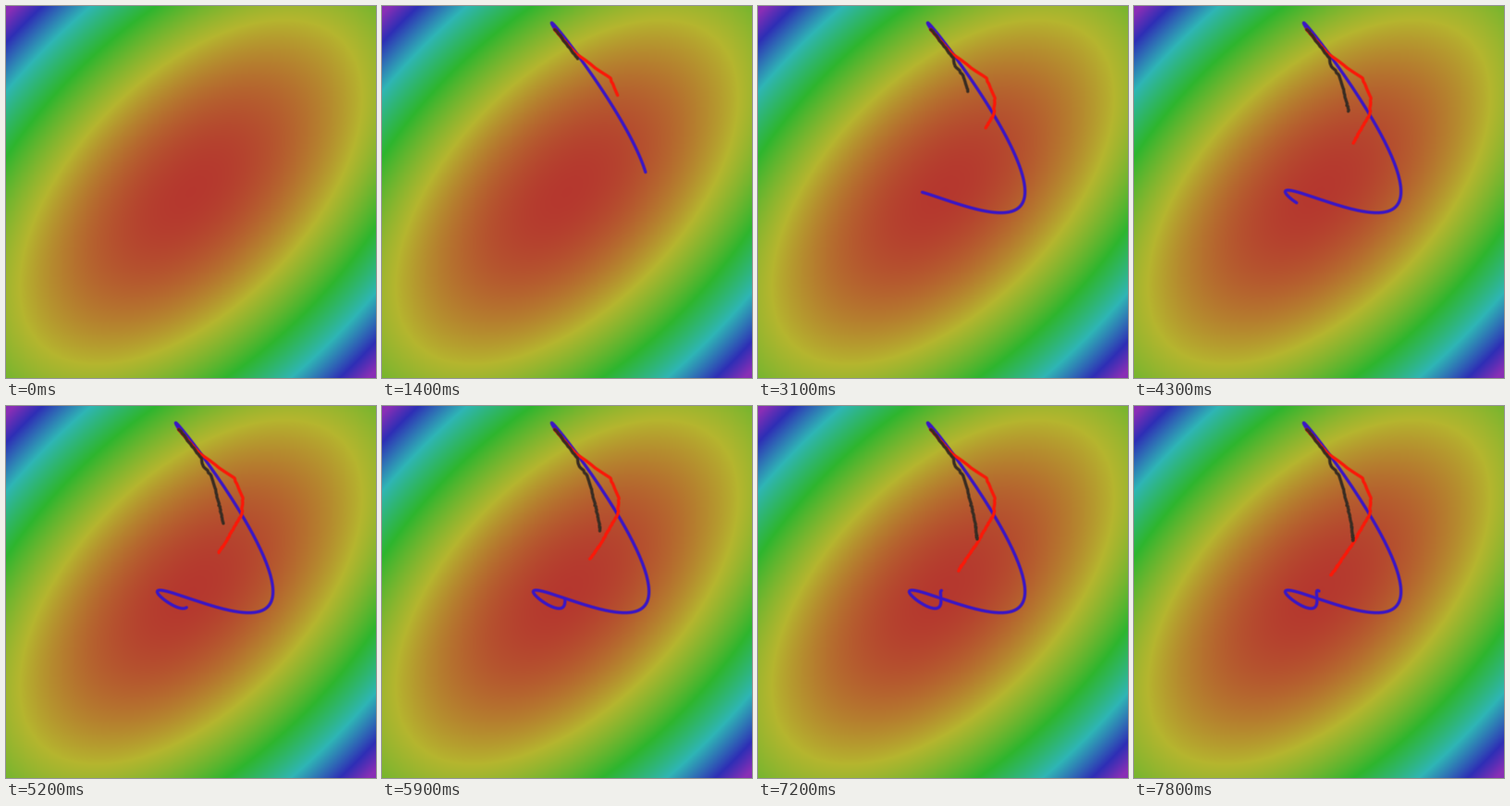
These frames come from a looping animation (400x402 px, 8 s). A matplotlib script:

```python
import numpy as np
import matplotlib.pyplot as plt
from matplotlib.animation import FuncAnimation
from matplotlib.colors import hsv_to_rgb

W, H, DPI = 400, 402, 64
FRAMES, STEP_MS, LAST = 80, 100, 78
SUB = 4  # path samples per frame
START, CENTER = np.array([187, 25]), np.array([200, 201])


def landscape():
    """Quadratic bowl, height shown as hue."""
    x, y = np.meshgrid((np.arange(W) + 0.5) / 200 - 1,
                       (np.arange(H) + 0.5) / 201 - 1)
    hue = 0.012 + 0.259 * (x * x + y * y + 1.1 * x * y)
    return hsv_to_rgb(np.dstack([np.minimum(hue, 0.78),
                                 np.full_like(hue, 0.745),
                                 np.full_like(hue, 0.71)]))


def ring(t, freq, lag, tau, power):
    """Damped swing that starts at 1."""
    return np.exp(-(t / tau) ** power) * (np.cos(freq * t)
                                          + lag * np.sin(freq * t))


def momentum(t):
    """Heavy ball: one swing along each main axis of the bowl."""
    steep, flat = np.array([1, 1]) / 2 ** 0.5, np.array([1, -1]) / 2 ** 0.5
    offset = START - CENTER
    return (CENTER
            + np.outer(ring(t, 0.18, 0.45, 24, 1.3), steep) * (offset @ steep)
            + np.outer(ring(t, 0.069, 0.27, 35, 1.8), flat) * (offset @ flat))


def wander(t, progress, corners, seed):
    """Follow the corners by travelled share, with a slight wobble."""
    pts = np.vstack([START, corners])
    dist = np.r_[0, np.cumsum(np.hypot(*np.diff(pts, axis=0).T))]
    jitter = np.random.default_rng(seed).uniform(-0.5, 0.5, (2, LAST + 1))
    return np.column_stack([
        np.interp(progress * dist[-1], dist, pts[:, c])
        + np.interp(t, np.arange(LAST + 1), jitter[c]) for c in (0, 1)])


time = np.linspace(0, LAST, LAST * SUB + 1)
share = time / LAST
descent = wander(time, share ** 0.4,
                 [(210, 52), (247, 78), (256, 100), (255, 117), (235, 151),
                  (213, 183)], 3)
adaptive = wander(time, 1 - (1 - share) ** 1.8,
                  [(211, 56), (213, 65), (222, 75), (227, 92), (235, 127),
                   (237, 145)], 8)

fig = plt.figure(figsize=(W / DPI, H / DPI), dpi=DPI)
ax = fig.add_axes([0, 0, 1, 1])
ax.imshow(landscape(), extent=(0, W, H, 0), aspect="auto",
          interpolation="nearest")
ax.set(xlim=(0, W), ylim=(H, 0))
ax.axis("off")

trails = []
for path, color in ((momentum(time), "#3a16c4"), (descent, "#fa1808"),
                    (adaptive, "#392c22")):
    for width, alpha in ((4.2, 0.45), (2.6, 1)):  # soft edge, then core
        line, = ax.plot([], [], color=color, alpha=alpha,
                        lw=width * 72 / DPI, solid_capstyle="round",
                        solid_joinstyle="round")
        trails.append((line, path))


def draw(i):
    n = min(i, LAST) * SUB + 1 if i else 0
    for line, path in trails:
        line.set_data(path[:n, 0], path[:n, 1])
    return [line for line, _ in trails]


anim = FuncAnimation(fig, draw, frames=FRAMES, interval=STEP_MS,
                     repeat=True, repeat_delay=0, blit=False)
plt.show()
```
